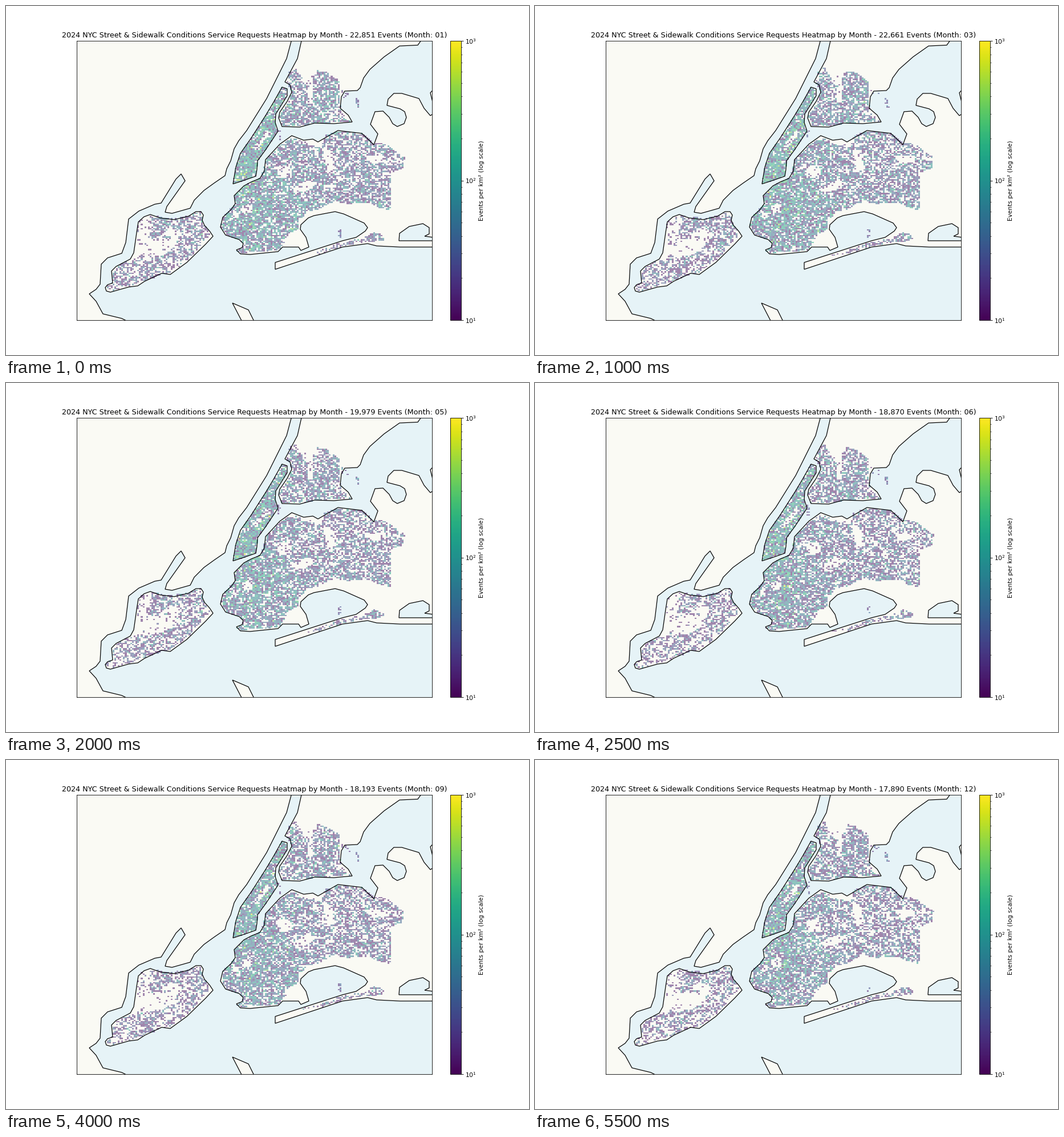
A matplotlib script for the animation above (6 s loop, 917 by 611 pixels).

```python
import numpy as np
import matplotlib.pyplot as plt
from matplotlib.animation import FuncAnimation
from matplotlib.cm import ScalarMappable
from matplotlib.colors import LogNorm
from matplotlib.patches import Polygon
from matplotlib.path import Path

WIDTH, HEIGHT, DPI = 917, 611, 100
SCALE = 0.764  # text and line sizes relative to matplotlib defaults
LEFT, RIGHT, TOP, BOTTOM = 124.4, 746.8, 61.1, 549.9
BINS = 200
CELL_KM2 = 0.079
WATER, LAND = "#e6f3f7", "#fafaf4"
EVENTS = [22851, 21540, 22661, 22104, 19979, 18870,
          19363, 19022, 18193, 17348, 16204, 17890]

# Coastlines, in stage pixels
WEST_SHORE = [
    (500, 50), (500, 62), (492, 92), (457, 162), (422, 218), (408, 236),
    (400, 250), (394, 271), (387, 285), (384, 297), (365, 310), (347, 323),
    (330, 340), (323, 354), (291, 363), (279, 361), (282, 351), (314, 306),
    (307, 294), (298, 303), (272, 345), (261, 347), (233, 359), (215, 373),
    (210, 414), (203, 433), (178, 441), (167, 452), (165, 487), (158, 496),
    (146, 504), (158, 517), (170, 539), (203, 547), (215, 553), (215, 570),
    (100, 570), (100, 50)]
STATEN = [
    (253, 365), (270, 371), (295, 374), (320, 368), (333, 360), (342, 360),
    (346, 366), (344, 375), (348, 384), (357, 394), (363, 403), (350, 417),
    (317, 449), (288, 470), (273, 468), (243, 482), (231, 490), (215, 492),
    (183, 501), (176, 499), (174, 493), (178, 488), (187, 485), (185, 464),
    (193, 456), (218, 443), (224, 432), (229, 397), (232, 378), (242, 369)]
MANHATTAN = [
    (484, 142), (493, 145), (493, 157), (473, 189), (472, 204), (477, 219),
    (455, 252), (441, 271), (440, 286), (438, 298), (415, 306), (398, 311.5),
    (403, 282), (411, 258), (430, 231), (455, 192), (470, 167)]
NORTH_LAND = [
    (518, 50), (518, 61), (511, 92), (489, 133), (498, 138), (501, 151),
    (493, 167), (480, 186), (478, 196), (484, 211), (515, 212), (541, 205),
    (575, 206), (607, 203), (600, 191), (586, 179), (588, 159), (594, 149),
    (616, 148), (621, 143), (627, 126), (638, 111), (663, 89), (690, 70),
    (722, 68.5), (728, 60), (733, 50)]
ISLAND_NORTH = [
    (770, 175), (750, 188), (744, 192), (733, 179), (724, 162), (694, 153),
    (680, 153), (670, 163), (668, 174), (691, 180), (699, 185), (702, 195),
    (698, 206), (686, 211), (678, 206), (672, 195), (661, 184), (647, 185),
    (639, 207), (652, 224), (645, 243), (624, 223), (582, 218), (547, 238),
    (538, 233), (522, 235), (501, 227), (480, 242), (455, 269), (453, 289),
    (445, 302), (430, 308), (417, 315), (400, 332), (402, 346), (395, 356)]
ISLAND_SOUTH = [
    (380, 370), (376, 387), (385, 401), (409, 409), (416, 416), (414, 423),
    (404, 427), (411, 434), (428, 435), (477, 430), (485, 422), (513, 422),
    (517, 428), (531, 422), (526, 405), (516, 391), (517, 383), (530, 371),
    (540, 367), (577, 360), (592, 364), (628, 380), (634, 388), (630, 394),
    (614, 405), (590, 411), (472, 449), (472, 461), (590, 422), (634, 416),
    (650, 420), (691, 422), (770, 422)]
EAST_POINT = [(755, 140), (744, 152), (748, 168), (760, 170)]
SOUTH_POINT = [(397, 520), (425, 532), (436, 554), (436, 570), (423, 570)]
EAST_BAY = [(770, 411), (689, 411), (690, 398), (707, 386), (731, 381),
            (742, 388), (742, 399), (734, 403), (770, 408)]

# Mean requests per cell inside each area
QUEENS = [
    (455, 270), (480, 244), (500, 231), (522, 237), (538, 242), (556, 240),
    (556, 228), (582, 219), (624, 223), (646, 240), (664, 241), (680, 252),
    (699, 265), (697, 284), (674, 292), (674, 357), (655, 354), (640, 345),
    (600, 346), (575, 342), (545, 357), (525, 360), (510, 330), (470, 288),
    (452, 284)]
BROOKLYN = [
    (447, 300), (452, 284), (470, 286), (485, 303), (510, 325), (527, 340),
    (525, 364), (512, 378), (515, 390), (500, 400), (490, 412), (478, 428),
    (412, 432), (404, 428), (414, 424), (416, 416), (409, 409), (385, 401),
    (377, 387), (380, 370), (402, 346), (400, 333), (417, 315)]
BRONX = [
    (497, 112), (508, 107), (517, 124), (540, 122), (546, 113), (563, 116),
    (586, 132), (584, 165), (590, 188), (604, 203), (545, 205), (515, 211),
    (484, 210), (480, 193), (497, 165), (501, 150), (491, 134)]
STATEN_STREETS = [
    (253, 366), (295, 371), (320, 366), (342, 360), (348, 384), (358, 400),
    (317, 447), (288, 466), (240, 482), (215, 491), (178, 500), (175, 492),
    (187, 482), (187, 466), (200, 452), (232, 440), (252, 424)]
AREAS = [
    (1.9, QUEENS), (3.3, BROOKLYN), (2.0, BRONX), (4.8, MANHATTAN),
    (1.2, STATEN_STREETS),
    (0.25, [(232, 374), (253, 368), (253, 420), (230, 418)]),
    (1.3, [(541, 430), (600, 410), (627, 408), (634, 413), (600, 418), (548, 435)]),
    (1.3, [(627, 406), (645, 396), (664, 402), (664, 411), (634, 413)]),
    (0.25, [(520, 434), (541, 428), (541, 437), (520, 441)]),
    (1.2, [(583, 391), (589, 391), (589, 406), (583, 406)]),
    (1.2, [(612, 162), (617, 162), (621, 178), (616, 178)]),
    (0.3, [(588, 147), (603, 152), (603, 161), (590, 160)]),
    (0.4, [(477, 212), (484, 212), (482, 236), (476, 232)])]
OPEN_SPACE = [
    [(433, 248), (439, 252), (465, 222), (459, 217)],
    [(517, 120), (540, 120), (537, 142), (522, 136)],
    [(528, 140), (540, 143), (537, 168), (530, 170)],
    [(412, 351), (432, 348), (434, 360), (416, 364)],
    [(398, 360), (410, 362), (406, 372), (396, 370)],
    [(472, 282), (498, 278), (502, 296), (482, 302)],
    [(500, 320), (528, 306), (547, 308), (535, 320), (508, 328)],
    [(555, 248), (570, 255), (578, 285), (564, 290)],
    [(517, 234), (556, 238), (552, 248), (522, 242)],
    [(628, 262), (664, 262), (668, 274), (640, 276)],
    [(488, 402), (515, 390), (512, 420), (490, 420)],
    [(254, 408), (303, 404), (298, 418), (278, 436), (240, 442)],
    [(287, 388), (310, 396), (300, 406), (270, 402)]]
# x, y, radius, extra weight
HOTSPOTS = [(418, 288, 16, 0.8), (430, 325, 20, 0.9), (495, 262, 24, 0.7),
            (424, 372, 16, 0.5), (452, 240, 12, 0.4), (458, 296, 12, 0.6)]

x_edges = np.linspace(LEFT, RIGHT, BINS + 1)
y_edges = np.linspace(TOP, BOTTOM, BINS + 1)
grid_x, grid_y = np.meshgrid((x_edges[1:] + x_edges[:-1]) / 2,
                             (y_edges[1:] + y_edges[:-1]) / 2)
centres = np.column_stack([grid_x.ravel(), grid_y.ravel()])


def inside(points):
    closed = points + points[:1]
    return Path(closed).contains_points(centres).reshape(grid_x.shape)


def request_rates():
    rng = np.random.default_rng(24)
    rates = np.zeros_like(grid_x)
    for mean, outline in AREAS:
        rates[inside(outline)] = mean
    for outline in OPEN_SPACE:
        rates[inside(outline)] *= 0.05
    waves = sum(np.sin(grid_x * kx + grid_y * ky + phase)
                for kx, ky, phase in rng.uniform(-0.25, 0.25, (6, 3)) * [1, 1, 12])
    rates *= np.exp(0.14 * waves)
    rates *= 1 + sum(gain * np.exp(-((grid_x - x) ** 2 + (grid_y - y) ** 2) / (2 * r * r))
                     for x, y, r, gain in HOTSPOTS)
    return rates * rng.gamma(1.6, 1 / 1.6, rates.shape)


RATES = request_rates()


def density(month):
    rng = np.random.default_rng(100 + month)
    flicker = rng.gamma(3, 1 / 3, RATES.shape)
    counts = rng.poisson(RATES * flicker * EVENTS[month] / 21500)
    return np.ma.masked_equal(counts / CELL_KM2, 0)


def heading(month):
    return ("2024 NYC Street & Sidewalk Conditions Service Requests Heatmap by Month"
            f" - {EVENTS[month]:,} Events (Month: {month + 1:02d})")


plt.rcParams["font.family"] = "DejaVu Sans"
for key in ("font.size", "axes.linewidth", "axes.titlepad", "axes.labelpad",
            "ytick.major.size", "ytick.major.width", "ytick.major.pad",
            "ytick.minor.size", "ytick.minor.width", "ytick.minor.pad"):
    plt.rcParams[key] *= SCALE

fig = plt.figure(figsize=(WIDTH / DPI, HEIGHT / DPI), dpi=DPI, facecolor="white")
ax = fig.add_axes([LEFT / WIDTH, 1 - BOTTOM / HEIGHT,
                   (RIGHT - LEFT) / WIDTH, (BOTTOM - TOP) / HEIGHT])
ax.set(xlim=(LEFT, RIGHT), ylim=(BOTTOM, TOP), xticks=[], yticks=[], facecolor=WATER)


def add_shape(points, color):
    ax.add_patch(Polygon(points, facecolor=color, edgecolor="none", zorder=1))
    ax.add_patch(Polygon(points, fill=False, edgecolor="black",
                         linewidth=1.15 * SCALE, zorder=3))


for shore in (WEST_SHORE, NORTH_LAND, ISLAND_NORTH + ISLAND_SOUTH, STATEN,
              MANHATTAN, EAST_POINT, SOUTH_POINT):
    add_shape(shore, LAND)
add_shape(EAST_BAY, WATER)

norm = LogNorm(10, 1000)
mesh = ax.pcolormesh(x_edges, y_edges, density(0), cmap="viridis", norm=norm,
                     alpha=0.5, zorder=2)
title = ax.set_title(heading(0))
ax.set(xlim=(LEFT, RIGHT), ylim=(BOTTOM, TOP))

bar = fig.colorbar(ScalarMappable(norm, "viridis"),
                   cax=fig.add_axes([0.85, 0.1, 0.02, 0.8]))
bar.set_label("Events per km² (log scale)")


def update(month):
    mesh.set_array(density(month))
    title.set_text(heading(month))
    return mesh, title


animation = FuncAnimation(fig, update, frames=len(EVENTS), interval=500,
                          repeat=True, repeat_delay=0, blit=False)
plt.show()
```
